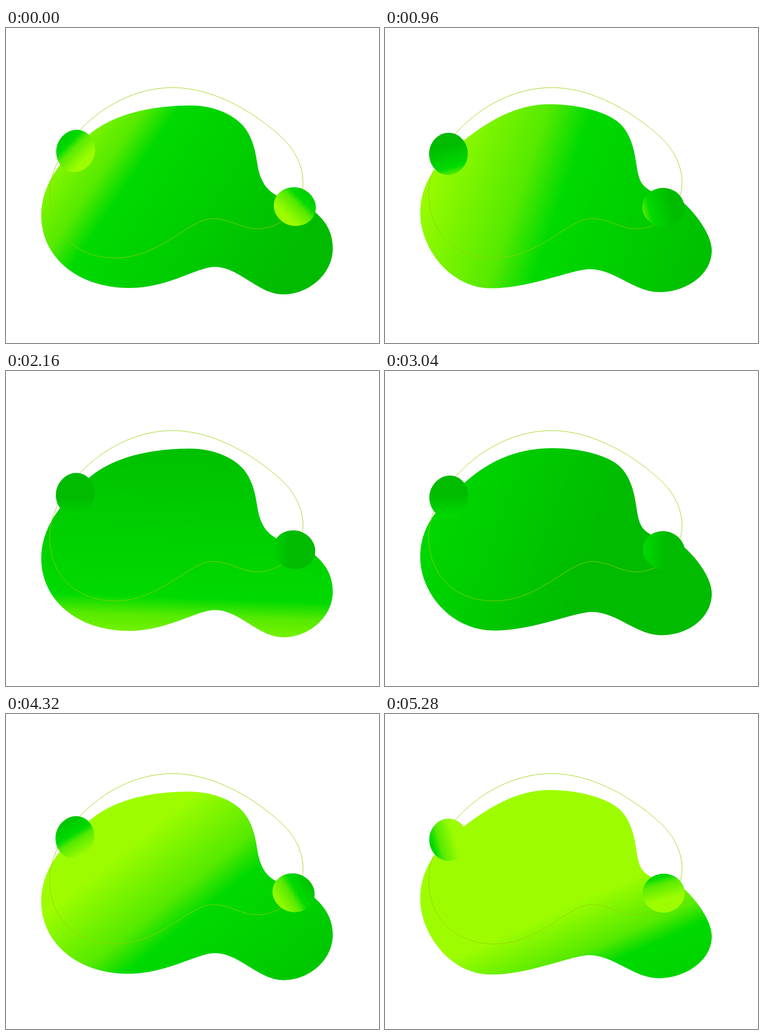
An HTML page with a canvas that plays this animation: 815x687 px, repeating every 5.36 s.

```html
<!DOCTYPE html>
<html lang="en">
<head>
<meta charset="utf-8">
<title>Green blob</title>
<style>
html, body { margin: 0; width: 100%; height: 100%; overflow: hidden; background: #fff; }
canvas { display: block; }
</style>
</head>
<body>
<canvas id="stage" width="815" height="687"></canvas>
<script>
const ctx = document.getElementById('stage').getContext('2d');
const STEP = 80, STEPS = 67, CYCLE = 1 / 0.1116; // ms, steps per loop, steps per morph cycle

// Each moving point has three poses, a third of a cycle apart, joined by one smooth wave.
let weights;
function setPhase(phase) {
  weights = [0, 1, 2].map(i => (1 + 2 * Math.cos(2 * Math.PI * (phase - i / 3))) / 3);
}
const mix = (...poses) => poses.reduce((sum, v, i) => sum + v * weights[i], 0);
const point = (a, b, c) => [mix(a[0], b[0], c[0]), mix(a[1], b[1], c[1])];

function blobPath() {
  const leftY = mix(409, 404.5, 403.5), rightY = mix(481, 485, 479), rise = mix(54, 50, 34);
  const [sx, sy] = point([180, 234], [173, 245], [180, 234]);       // shoulder
  const [tx, ty] = point([405, 169], [360, 166.5], [400, 163]);     // top
  const [vx, vy] = point([591, 365], [582, 356], [594, 363]);       // notch
  const [nx, ny] = point([676, 402], [652, 381], [681, 400]);       // neck
  const [rx, ry] = point([606, 581], [600, 576], [591, 582]);       // lower right
  const [bx, by] = point([456, 521], [448, 526], [443, 521]);       // bump
  const [lx, ly] = point([270, 567], [233, 567.5], [262, 572.5]);   // lower left
  const path = new Path2D();
  const to = (...p) => path.bezierCurveTo(...p);
  path.moveTo(77, leftY);
  to(77, leftY - 66, sx - 62, sy + rise, sx, sy);
  to(sx + 62, sy - rise, tx - 66, ty, tx, ty);
  to((tx + 492) / 2, ty, 492, 185, 517, 212);
  to(537, 235, 544, 262, 549, 295);
  to(554, 330, vx - 24, vy - 13, vx, vy);
  to(vx + 24, vy + 13, nx - 26, ny - 22, nx, ny);
  to(nx + 23, ny + 20, 714, rightY - 36, 714, rightY);
  to(714, rightY + 55, rx + 56, ry, rx, ry);
  to(rx - 55, ry, bx + 54, by, bx, by);
  to(bx - 38, by, lx + 84, ly, lx, ly);
  to(lx - .6 * (lx - 77), ly, 77, leftY + .46 * (lx - 77), 77, leftY);
  return path;
}

// Egg whose four extremes lean by the given skew.
function ballPath(skew) {
  const a = 42.3, b = 46, k = .55, j = skew * .7;
  const path = new Path2D();
  path.moveTo(skew, -b);
  path.bezierCurveTo(skew + a * k, -b, a, -j - b * k, a, -j);
  path.bezierCurveTo(a, -j + b * k, -skew + a * k, b, -skew, b);
  path.bezierCurveTo(-skew - a * k, b, -a, j + b * k, -a, j);
  path.bezierCurveTo(-a, j - b * k, skew - a * k, -b, skew, -b);
  return path;
}

const ring = new Path2D(`M364 130C450 130 540 180 605 241C635 270 649 305 649 337
  C649 395 600 438 549 438C513 438 490 415.5 452 415.5C400 415.5 338 501.5 239 501.5
  C152 501.5 95.5 445 95.5 362C95.5 315 122 264 162 222C212 169.5 285 130 364 130Z`);

// step, then for the blob: angle towards dark, place of the middle green, width of the lime side;
// for the balls: angle, place
const lights = [
  [0, 34, -125, 200, 225, 22],
  [12, 19, -10, 300, 255, -30],
  [27, -88, -125, 130, 270, -60],
  [38, 20, -330, 120, 270, -45],
  [49, 40, -75, 250, 238, 8],
  [59, 62, 208, 170, 239, 7],
  [66, 66, 197, 150, 165, 36]
];

function lightAt(step) {
  const i = Math.max(1, lights.findIndex(key => key[0] >= step));
  const a = lights[i - 1], b = lights[i], k = (step - a[0]) / (b[0] - a[0]);
  return a.map((v, j) => v + (b[j] - v) * k);
}

function shade(cx, cy, degrees, middle, limeWidth, darkWidth) {
  const angle = degrees * Math.PI / 180, dx = Math.cos(angle), dy = Math.sin(angle);
  const from = middle - limeWidth, to = middle + darkWidth;
  const g = ctx.createLinearGradient(cx + dx * from, cy + dy * from, cx + dx * to, cy + dy * to);
  const mid = limeWidth / (limeWidth + darkWidth);
  g.addColorStop(0, '#9dfd00');
  g.addColorStop(mid * .7, '#56ea00');
  g.addColorStop(mid, '#00da00');
  g.addColorStop(1, '#00bb00');
  return g;
}

function drawBall([x, y], turn, path, angle, middle) {
  ctx.save();
  ctx.translate(x, y);
  ctx.rotate(turn);
  ctx.fillStyle = shade(0, 0, angle, middle, 50, 50);
  ctx.fill(path);
  ctx.restore();
}

function draw(now) {
  const step = Math.floor(now / STEP) % STEPS;
  setPhase(step / CYCLE);
  const [, angle, middle, limeWidth, ballAngle, ballMiddle] = lightAt(step);
  ctx.clearRect(0, 0, 815, 687);
  ctx.fillStyle = shade(395, 370, angle, middle, limeWidth, 400);
  ctx.fill(blobPath());
  ctx.strokeStyle = '#94d000';
  ctx.stroke(ring);

  const egg = ballPath(mix(2, .5, -4));
  drawBall(point([152, 268], [138.5, 274.5], [155, 267]), 0, egg, ballAngle, ballMiddle);
  drawBall(point([631, 389.5], [608, 391], [635, 387]), Math.PI / 2, egg, ballAngle, ballMiddle);
}

let start;
function tick(now) {
  start ??= now;
  draw(now - start);
  requestAnimationFrame(tick);
}
draw(0);
requestAnimationFrame(tick);
</script>
</body>
</html>
```
